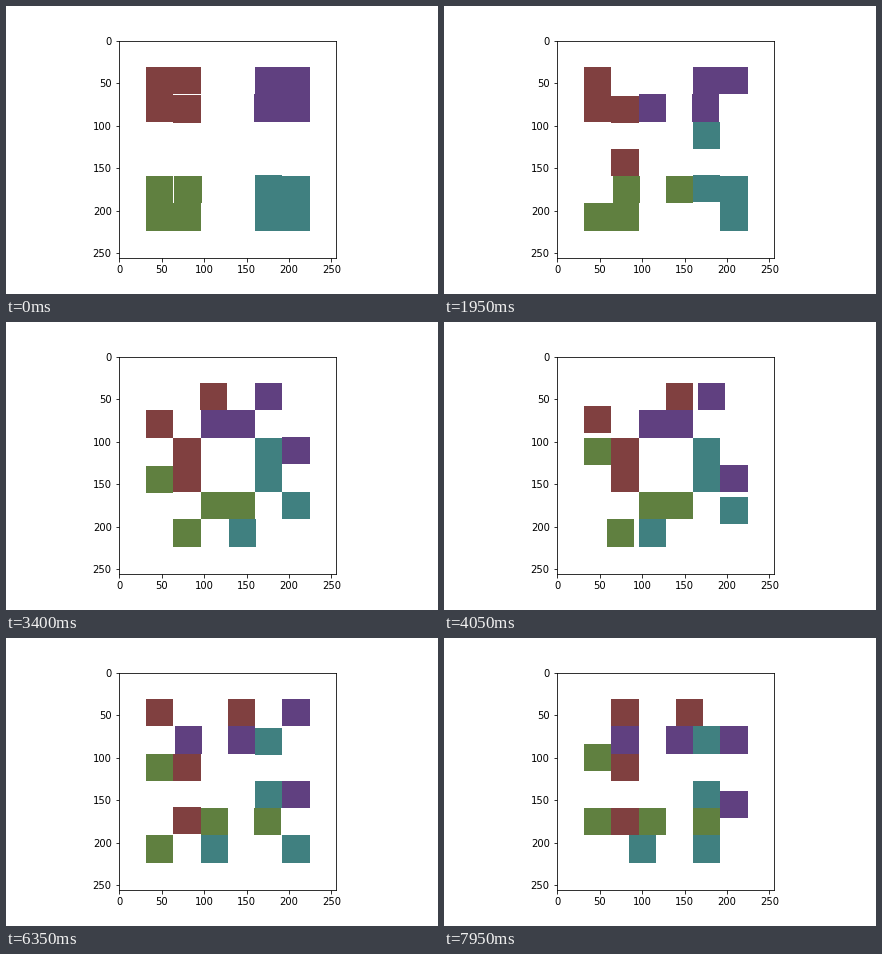
A matplotlib script that plays this animation: 432 by 288 pixels, repeating every 8 s.

```python
import numpy as np
import matplotlib.pyplot as plt
from matplotlib.animation import FuncAnimation

SIZE, CELL = 256, 32
FRAMES, STEP_MS = 160, 50
MOVE_MS, LEAD = 1289, 0.0223

DARK, MID, LIGHT = SIZE // 4, SIZE * 3 // 8, SIZE // 2
COLORS = [(LIGHT, DARK, DARK), (MID, DARK, LIGHT),
          (DARK, LIGHT, LIGHT), (MID, LIGHT, DARK)]

# Cells are complex numbers, column + row * 1j.
RIGHT, DOWN = 1, 1j
UP = -DOWN
BLOCK = {"outer": 1 + 1j, "top": 2 + 1j, "side": 1 + 2j, "inner": 2 + 2j}
MOVES = [("inner", DOWN, 2), ("top", DOWN, 2), ("outer", RIGHT, 3),
         ("side", UP, 1), ("inner", DOWN, 1), ("side", RIGHT, 1),
         ("outer", RIGHT, 2)]


def tiles_at(ms):
    """Top left corners of the first block's tiles, in image pixels."""
    progress = ms / MOVE_MS + LEAD
    tiles = {name: cell * CELL for name, cell in BLOCK.items()}
    for i, (name, direction, cells) in enumerate(MOVES):
        part = min(max(progress - i, 0), 1)
        tiles[name] += direction * int(part * cells * CELL)
    return list(tiles.values())


def draw_image(frame):
    img = np.full((SIZE, SIZE, 3), 255, dtype=np.uint8)
    tiles = tiles_at(frame * STEP_MS)
    for color in COLORS:
        for z in tiles:
            x, y = int(z.real), int(z.imag)
            img[y:y + CELL, x:x + CELL] = color
        # a quarter turn about the centre gives the next block
        tiles = [z * 1j + SIZE - CELL for z in tiles]
    return img


plt.rcParams["font.family"] = "DejaVu Sans"
fig, ax = plt.subplots(figsize=(6, 4), dpi=72)
fig.subplots_adjust(left=0.125, right=0.9, bottom=0.125, top=0.88)
picture = ax.imshow(draw_image(0), interpolation="nearest")


def update(frame):
    picture.set_data(draw_image(frame))
    return [picture]


anim = FuncAnimation(fig, update, frames=FRAMES, interval=STEP_MS,
                     repeat=True, repeat_delay=0)
plt.show()
```
